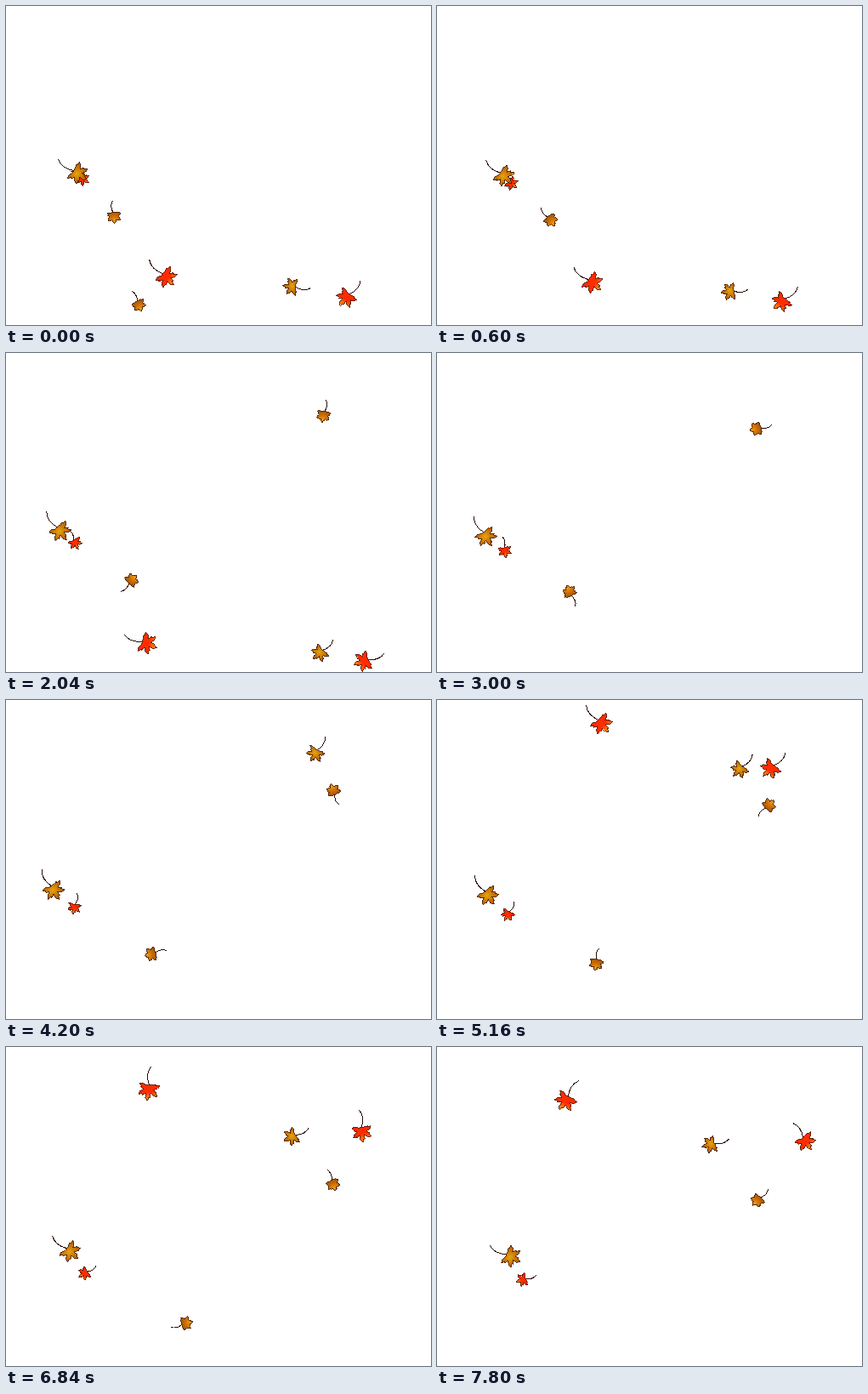
Animation, 500 px wide and 375 px high, one loop 8 s. Source, as an HTML page:

```html
<!DOCTYPE html>
<html lang="en">
<head>
<meta charset="utf-8">
<title>Falling leaves</title>
<style>
  html, body { margin: 0; width: 100%; height: 100%; overflow: hidden; background: #fff; }
  svg { display: block; width: 100%; height: 100%; }
</style>
</head>
<body>
<svg id="stage" viewBox="0 0 500 375" shape-rendering="crispEdges">
  <defs>
    <radialGradient id="gold" cx=".66" cy=".45" r=".7">
      <stop offset="0" stop-color="#e6a60c"/>
      <stop offset=".4" stop-color="#cc7c08"/>
      <stop offset="1" stop-color="#a65000"/>
    </radialGradient>
    <radialGradient id="brown" cx=".25" cy=".5" r=".75">
      <stop offset="0" stop-color="#f09a10"/>
      <stop offset=".5" stop-color="#cc7008"/>
      <stop offset="1" stop-color="#a85600"/>
    </radialGradient>
    <linearGradient id="red" x1=".9" y1=".4" x2=".05" y2=".6">
      <stop offset=".45" stop-color="#ff2c00"/>
      <stop offset=".75" stop-color="#ff7010"/>
      <stop offset="1" stop-color="#ff9020"/>
    </linearGradient>
  </defs>
</svg>
<script>
const LOOP = 8000, STEP = 240, LEAD = 120;
const EDGE = { gold: '#4a2000', brown: '#4a2000', red: '#5a1800' };
const stage = document.getElementById('stage');
const { cos, sin, max, floor, abs, PI } = Math;
const leaves = [];

function add(parent, name, attrs) {
  const el = document.createElementNS('http://www.w3.org/2000/svg', name);
  for (const key in attrs) el.setAttribute(key, attrs[key]);
  return parent.appendChild(el);
}

// Five toothed lobes fanned around the far tip, closed at the stem.
function leafPoints(size, round) {
  const points = [];
  const put = (deg, r) => {
    const a = deg * PI / 180, d = size * (r + (.86 - r) * round);
    points.push(`${(-d * cos(a)).toFixed(2)},${(d * sin(a)).toFixed(2)}`);
  };
  for (let k = -2; k <= 2; k++) {
    const mid = k * 57, scale = 1 - .03 * abs(k);
    put(mid - 28, .44);
    for (const side of [-1, 1]) {
      put(mid + side * 12 - 3, (side < 0 ? .84 : .74) * scale);
      if (side < 0) put(mid, 1.1 * scale);
      else put(mid + 15, .84 * scale);
    }
  }
  put(143, .5);
  put(180, .38);
  return points.join(' ');
}

// A leaf is shown from step `from` to `to`; move(steps since from) gives x, y and stem angle.
// `bend` is the side to which the stem bows.
function leaf(fill, size, stem, bend, from, to, move) {
  const group = add(stage, 'g', {});
  add(group, 'path', {
    d: `M${size * .35} 0Q${stem * .65} ${bend * stem * .24} ${stem} 0`,
    fill: 'none', stroke: '#2c0c04'
  });
  add(group, 'polygon', {
    points: leafPoints(size, fill === 'brown' ? .35 : 0),
    fill: `url(#${fill})`, stroke: EDGE[fill], 'stroke-width': .9
  });
  leaves.push({ group, from, to, move });
}

leaf('red', 8, 16, 1, 0, 32, n =>
  [89.8 - 1.56 * n + .06 * n * n, 203 + 2.55 * n - .011 * n * n, 4.1 * n - 149]);
leaf('gold', 12.6, 27, -1, 0, 32, n =>
  [84 - 28.5 * cos(.1 * (n - 15.6)), 196 + 1.56 * n, -120 - .11 * (n - 15) ** 2]);
leaf('brown', 8.7, 18, -1, 0, 31, n =>
  [123.5 + 3 * n + 4 * cos(.26 * (n - 2)), 247 + 2.87 * n - 3 * sin(.26 * n), -95 - 16.4 * n]);
leaf('brown', 8.7, 18, 1, 0, 0, () => [156, 351, -117]);
leaf('red', 12.6, 28, -1, 0, 11, n =>
  [188 - 2.9 * n, 318 + 3.4 * n - .065 * n * n, -134 - 3 * n]);
leaf('gold', 10.5, 21, 1, 0, 11, n => [337 + 4.1 * n, 330 + 2.75 * n, 5 - 6.2 * n]);
leaf('red', 12, 25, 1, 0, 11, n => [401 + 2.6 * n, 342 + 2.5 * n, 3.6 * n - 50]);
leaf('brown', 8.7, 18, 1, 6, 32, n =>
  [382 - 8.5 * cos(.22 * (n - 2)), 60.5 + 4.46 * n + 3.5 * cos(.27 * (n - 2)), 16.4 * n - 113]);
leaf('gold', 10.5, 22, 1, 13, 32, n =>
  [370 - 1.1 * n - .073 * n * n, 40 + 6 * n - .11 * n * n, 2.9 * n - 72]);
leaf('red', 12.8, 27, -1, 21, 32, n => [193 - 3.3 * n - .04 * n * n, 27 + 3.2 * n, 6.7 * n - 130]);
leaf('red', 12, 25, 1, 21, 32, n => [393 + 3.64 * n, 80 + 2.73 * n, -47 - 7.1 * n]);

function draw(ms) {
  const step = max(0, floor((ms % LOOP - LEAD) / STEP));
  for (const { group, from, to, move } of leaves) {
    const shown = step >= from && step <= to;
    group.style.display = shown ? '' : 'none';
    if (!shown) continue;
    const [x, y, angle] = move(step - from);
    group.setAttribute('transform', `translate(${x} ${y}) rotate(${angle})`);
  }
}

const start = performance.now();
function tick() {
  draw(performance.now() - start);
  requestAnimationFrame(tick);
}
tick();
</script>
</body>
</html>
```
